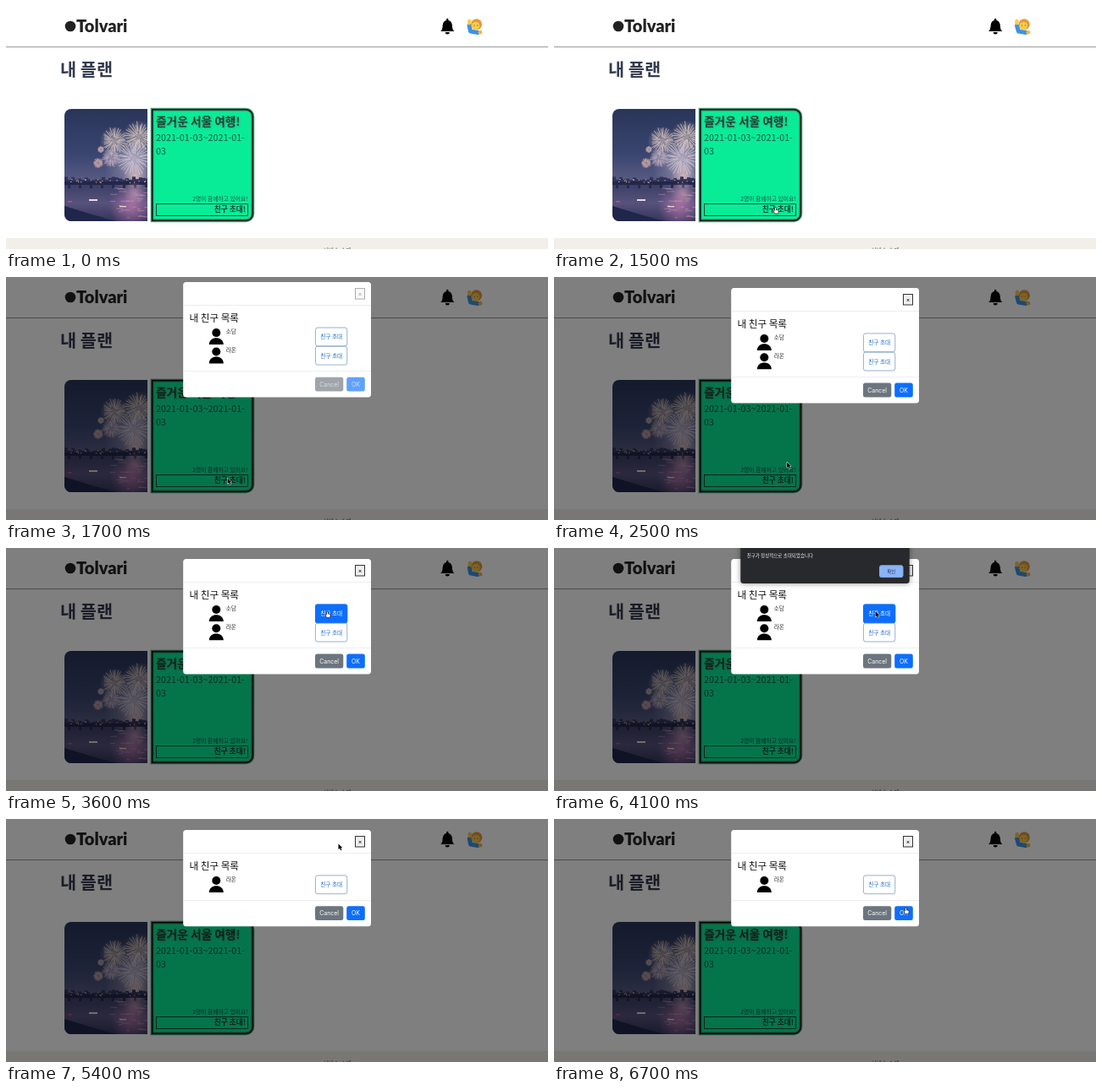
These frames come from a looping animation (640 px wide and 288 px high, 6.8 s). An HTML page with a canvas:

```html
<!DOCTYPE html>
<html lang="ko">
<head>
<meta charset="utf-8">
<title>내 플랜</title>
<style>
html, body { margin: 0; width: 100%; height: 100%; overflow: hidden; background: #fff; }
canvas { display: block; width: 640px; height: 288px; }
</style>
</head>
<body>
<canvas id="stage"></canvas>
<script>
const W = 640, H = 288, LOOP = 6800;
const KR = '"Noto Sans CJK KR", "Noto Sans CJK", "Noto Sans", sans-serif';
const UI = 'Inter, Roboto, sans-serif';
const BLUE = '#0d6efd', INK = '#1f5646';
const OPEN = 1550, ALERT_ON = 3800, ALERT_OFF = 5100;
const FRIENDS = ['소담', '라온'];

const canvas = document.getElementById('stage');
const ratio = window.devicePixelRatio || 1;
canvas.width = W * ratio;
canvas.height = H * ratio;
const ctx = canvas.getContext('2d');

const clamp = v => Math.max(0, Math.min(1, v));
const smooth = v => v * v * (3 - 2 * v);

function rect(x, y, w, h, fill) {
  ctx.fillStyle = fill;
  ctx.fillRect(x, y, w, h);
}

function box(x, y, w, h, r, fill, stroke, line = 1) {
  ctx.beginPath();
  ctx.roundRect(x, y, w, h, r);
  if (fill) { ctx.fillStyle = fill; ctx.fill(); }
  if (stroke) { ctx.strokeStyle = stroke; ctx.lineWidth = line; ctx.stroke(); }
}

function disc(x, y, r, fill) {
  ctx.beginPath();
  ctx.arc(x, y, r, 0, 7);
  ctx.fillStyle = fill;
  ctx.fill();
}

function glow(x, y, r, color, alpha) {
  const g = ctx.createRadialGradient(x, y, 0, x, y, r);
  g.addColorStop(0, color);
  g.addColorStop(1, color + '00');
  faded(alpha, () => disc(x, y, r, g));
}

function text(s, x, y, size, fill, { weight = 400, font = KR, align = 'left' } = {}) {
  ctx.font = `${weight} ${size}px ${font}`;
  ctx.textAlign = align;
  ctx.fillStyle = fill;
  ctx.fillText(s, x, y);
}

function faded(alpha, draw) {
  ctx.save();
  ctx.globalAlpha *= alpha;
  draw();
  ctx.restore();
}

function seeded(seed) {
  return () => (seed = (seed * 16807) % 2147483647) / 2147483647;
}

// Fireworks over a river at dusk
function burst(x, y, r, color, rnd) {
  glow(x, y, r * 1.1, color, 0.6);
  ctx.strokeStyle = color;
  ctx.lineWidth = 0.7;
  ctx.beginPath();
  for (let i = 0; i < 32; i++) {
    const a = i / 32 * Math.PI * 2 + rnd() * 0.15;
    const inner = r * (0.15 + rnd() * 0.3), outer = r * (0.75 + rnd() * 0.3);
    ctx.moveTo(x + Math.cos(a) * inner, y + Math.sin(a) * inner);
    ctx.lineTo(x + Math.cos(a) * outer, y + Math.sin(a) * outer);
  }
  ctx.stroke();
}

function photo() {
  const rnd = seeded(77);
  ctx.save();
  ctx.beginPath();
  ctx.roundRect(69, 122, 98, 133, [8, 0, 0, 8]);
  ctx.clip();
  const sky = ctx.createLinearGradient(0, 122, 0, 212);
  sky.addColorStop(0, '#2a3559');
  sky.addColorStop(0.6, '#3a4570');
  sky.addColorStop(1, '#5d5f86');
  rect(69, 122, 98, 90, sky);
  const river = ctx.createLinearGradient(0, 212, 0, 255);
  river.addColorStop(0, '#3c3f66');
  river.addColorStop(0.5, '#56527c');
  river.addColorStop(1, '#34345a');
  rect(69, 212, 98, 43, river);

  glow(150, 190, 34, '#a09ab4', 0.75);
  burst(128, 160, 16, '#e6cfc6', rnd);
  burst(157, 155, 18, '#ecd6c8', rnd);
  burst(151, 180, 21, '#ddd0dc', rnd);
  burst(124, 180, 11, '#c9b4c4', rnd);
  burst(109, 186, 6, '#cfa9a8', rnd);
  burst(112, 170, 4, '#b9a6ae', rnd);
  glow(153, 202, 15, '#f0cfc8', 0.7);

  for (let x = 69; x < 167; x += 4) {
    const h = 1 + rnd() * 5;
    rect(x, 208 - h, 4, h + 2, '#30345a');
  }
  rect(69, 208, 98, 4, '#22264a');
  for (let x = 73; x < 167; x += 13) rect(x, 211, 3, 5, '#262a4c');
  for (let i = 0; i < 22; i++) rect(70 + rnd() * 95, 205 + rnd() * 4, 1.3, 1, '#e6b48e');

  glow(148, 238, 26, '#c07ab0', 0.75);
  glow(152, 222, 14, '#d6a4bc', 0.6);
  for (let i = 0; i < 26; i++) {
    faded(0.4, () => rect(122 + rnd() * 42, 215 + rnd() * 36, 3 + rnd() * 7, 1, '#e2b2cc'));
  }
  rect(98, 229, 10, 2, '#f0d5d8');
  rect(73, 231, 5, 1.5, '#c74f6e');
  rect(134, 237, 8, 1.3, '#e9d4d0');
  ctx.beginPath();
  ctx.moveTo(69, 237);
  ctx.quadraticCurveTo(100, 247, 130, 255);
  ctx.lineTo(69, 255);
  ctx.fillStyle = '#20254a';
  ctx.fill();
  ctx.restore();
}

function bell() {
  ctx.fillStyle = '#000';
  ctx.beginPath();
  ctx.moveTo(513, 30);
  ctx.bezierCurveTo(516, 28, 515.3, 24, 515.8, 22);
  ctx.bezierCurveTo(516.2, 19, 518, 17.6, 520, 17);
  ctx.lineTo(520, 16);
  ctx.arc(521.2, 16, 1.2, Math.PI, 0);
  ctx.lineTo(522.4, 17);
  ctx.bezierCurveTo(524.5, 17.6, 526.2, 19, 526.7, 22);
  ctx.bezierCurveTo(527.2, 24, 526.5, 28, 529.6, 30);
  ctx.closePath();
  ctx.fill();
  ctx.beginPath();
  ctx.arc(521.2, 31, 2.5, 0, Math.PI);
  ctx.fill();
}

function avatar(t) {
  const sway = Math.sin(t / LOOP * Math.PI * 2 * 8) * 0.7;
  ctx.lineCap = ctx.lineJoin = 'round';
  ctx.lineWidth = 5;
  ctx.strokeStyle = '#3c93e6';
  ctx.beginPath();
  ctx.moveTo(547 + sway * 0.5, 23.5);
  ctx.lineTo(548.5, 30);
  ctx.lineTo(557, 31.5);
  ctx.stroke();
  ctx.lineCap = 'butt';
  ctx.lineJoin = 'miter';
  disc(555.5 + sway * 0.4, 21.8, 6.6, '#e39a3c');
  disc(554.6 + sway * 0.4, 23.6, 4.7, '#fbcb4b');
  box(545 + sway, 15.8, 4.4, 6.5, 2, '#fbcb4b');
  disc(560, 31.2, 2.4, '#f2b945');
  disc(553 + sway * 0.4, 23, 0.6, '#5b3d20');
  disc(556.6 + sway * 0.4, 23, 0.6, '#5b3d20');
}

function card() {
  box(172.7, 122.7, 118.6, 131.6, [0, 8, 8, 0], '#08ec98', '#3f9c78', 4);
  box(172.7, 122.7, 118.6, 131.6, [0, 8, 8, 0], null, '#05130d', 1.5);
  ctx.save();
  ctx.shadowColor = 'rgba(90,120,108,.6)';
  ctx.shadowBlur = 2 * ratio;
  ctx.shadowOffsetX = ctx.shadowOffsetY = ratio;
  text('즐거운 서울 여행!', 177, 142, 13.7, '#1c4034', { weight: 700 });
  ctx.restore();
  text('2021-01-03~2021-01-', 177, 160, 10.8, INK);
  text('03', 177, 176, 10.8, INK);
  text('2명이 함께하고 있어요!', 285.5, 231, 6.8, INK, { align: 'right' });
  ctx.strokeStyle = '#0b4a34';
  ctx.lineWidth = 1;
  ctx.strokeRect(177.5, 234.5, 108, 14);
  text('친구 초대!', 283, 244.3, 8.7, '#1c4034', { weight: 700, align: 'right' });
}

function page(t) {
  rect(0, 0, W, H, '#fff');
  rect(0, 48, W, 1, '#999');
  disc(76, 24, 6.3, '#222');
  text('Tolvari', 83, 31, 20, '#222', { weight: 900, font: 'Lato, sans-serif' });
  bell();
  avatar(t);
  text('내 플랜', 64, 83, 20.8, '#353b4e', { weight: 700 });
  photo();
  card();
  rect(0, 275, W, 13, '#f2efe9');
  text('서비스 소개', 391, 292, 6.8, '#555', { align: 'center' });
}

function person(x, y) {
  disc(x, y + 5, 5, '#000');
  ctx.beginPath();
  ctx.moveTo(x - 8.5, y + 19);
  ctx.bezierCurveTo(x - 8.5, y + 8.5, x + 8.5, y + 8.5, x + 8.5, y + 19);
  ctx.fill();
}

function friendRow(name, y, active) {
  person(248.3, y + 1.5);
  text(name, 259.7, y + 7.5, 6.5, '#212529');
  box(365.4, y + 0.4, 37.4, 21.8, 2.5, '#fff', '#7c9cc8', 0.8);
  if (active) faded(active, () => box(365, y, 38.2, 22.6, 2.5, BLUE));
  text('친구 초대', 384.2, y + 13.7, 6.7, active > 0.5 ? '#fff' : '#1f6cc4', { align: 'center' });
}

function modal(t) {
  const age = t - OPEN;
  const fade = clamp(age / 150);
  if (age <= 0) return;
  faded(fade * 0.5, () => rect(0, 0, W, H, '#000'));

  const friends = t < ALERT_OFF ? FRIENDS : FRIENDS.slice(1);
  const end = 66.5 + friends.length * 22.3 + 7.2;
  const enabled = age >= 300;
  const hover = t < ALERT_OFF ? clamp((t - 3100) / 150) : 0;

  ctx.save();
  ctx.globalAlpha = fade;
  ctx.translate(0, -22 * Math.pow(1 - clamp(age / 300), 1.66));
  box(209.2, 13, 221.8, end + 31.2 - 13, 3.5, '#fff');
  rect(209.2, 40, 221.8, 0.6, '#dee2e6');
  faded(enabled ? 1 : 0.4, () => {
    ctx.lineWidth = 1;
    rect(412, 20, 12, 13, '#efefef');
    ctx.strokeStyle = '#333';
    ctx.strokeRect(412.5, 20.5, 11, 12.5);
    text('×', 418, 29.3, 7, '#000', { font: UI, align: 'center' });
  });
  text('내 친구 목록', 216.5, 59.5, 11.6, '#111');
  friends.forEach((name, i) => friendRow(name, 66.5 + i * 22.3, i ? 0 : hover));
  rect(209.2, end, 221.8, 0.6, '#dee2e6');
  faded(enabled ? 1 : 0.65, () => {
    const y = end + 7.3;
    box(365, y, 33.3, 16.8, 2.5, '#6c757d');
    box(402.2, y, 21.6, 16.8, 2.5, BLUE);
    text('Cancel', 381.6, y + 10.9, 6.9, '#fff', { font: UI, align: 'center' });
    text('OK', 413, y + 10.9, 6.9, '#fff', { font: UI, align: 'center' });
  });
  ctx.restore();
}

function alertBox(t) {
  if (t < ALERT_ON || t >= ALERT_OFF) return;
  faded(clamp((t - ALERT_ON + 60) / 120), () => {
    ctx.save();
    ctx.shadowColor = 'rgba(0,0,0,.45)';
    ctx.shadowBlur = 6 * ratio;
    box(220.3, -6, 199.4, 48, 3.5, '#28292d');
    ctx.restore();
    text('친구가 정상적으로 초대되었습니다', 227.7, 11, 5.5, '#f1f1f1');
    const pressed = t >= 4850;
    box(384.5, 20.8, 27.5, 13.8, 2, pressed ? '#7189cc' : '#8ab4f8', '#87a9ec', 1);
    text('확인', 398.2, 29.8, 5.4, '#232a3c', { align: 'center' });
  });
}

// Pointer stops: time, x, y
const STOPS = [
  [350, 112, 292], [700, 161, 258], [1350, 261.5, 238.5], [2300, 261.5, 238.5],
  [3250, 379.5, 75], [4300, 379.5, 75], [4800, 392.5, 29.5], [6200, 392.5, 29.5],
  [6650, 415.5, 105], [LOOP, 415.5, 105]
];

function pointerAt(t) {
  const i = STOPS.findIndex(s => s[0] > t);
  if (i < 1) return null;
  const [t0, x0, y0] = STOPS[i - 1], [t1, x1, y1] = STOPS[i];
  const k = smooth((t - t0) / (t1 - t0));
  return [x0 + (x1 - x0) * k, y0 + (y1 - y0) * k];
}

function arrow(x, y) {
  ctx.beginPath();
  [[0, 0], [0, 6.6], [1.6, 5.3], [2.7, 7.7], [3.9, 7.2], [2.8, 4.8], [4.8, 4.7]]
    .forEach(([dx, dy]) => ctx.lineTo(x + dx, y + dy));
  ctx.closePath();
  ctx.strokeStyle = '#fff';
  ctx.lineWidth = 1;
  ctx.stroke();
  ctx.fillStyle = '#000';
  ctx.fill();
}

function hand(x, y) {
  box(x - 0.8, y, 1.6, 5, 0.8, '#fff', '#111', 0.7);
  box(x - 1.8, y + 3, 5.4, 4.6, 1.6, '#fff', '#111', 0.7);
  rect(x - 0.45, y + 1, 0.9, 4, '#fff');
}

function pointer(t) {
  const p = pointerAt(t);
  if (!p) return;
  const [x, y] = p;
  const inside = (l, top, r, b) => x > l && x < r && y > top && y < b;
  const link = t < OPEN
    ? inside(177, 234, 286, 249)
    : (t < ALERT_ON && inside(365, 66, 403, 111)) || (t > ALERT_OFF && inside(402, 103, 424, 120));
  (link ? hand : arrow)(x, y);
}

function frame(now) {
  const t = now % LOOP;
  ctx.setTransform(ratio, 0, 0, ratio, 0, 0);
  page(t);
  modal(t);
  alertBox(t);
  pointer(t);
}

const start = performance.now();
function tick() {
  frame(performance.now() - start);
  requestAnimationFrame(tick);
}
tick();
</script>
</body>
</html>
```
